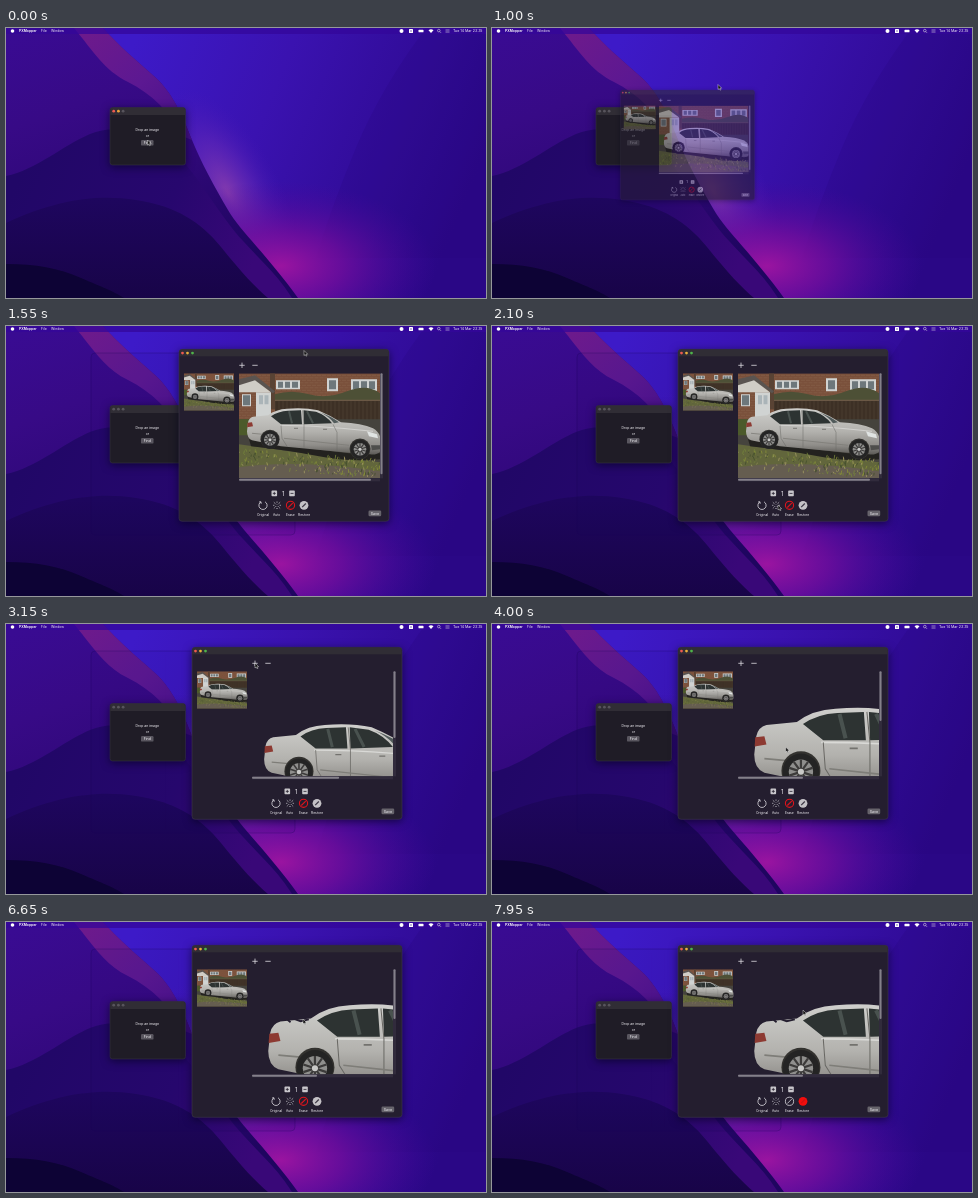
An HTML page that plays this animation: 480 by 270 pixels, repeating every 8000 ms.

```html
<!DOCTYPE html>
<html lang="en">
<head>
<meta charset="utf-8">
<title>Background eraser demo</title>
<style>
html, body { margin: 0; width: 100%; height: 100%; overflow: hidden; background: #1d0758; }
svg { display: block; width: 100vw; height: 100vh; }
text { font-family: Inter, "Open Sans", sans-serif; font-size: 3.6px; fill: #f2f0f5; }
.mid { text-anchor: middle; }
.line { fill: none; stroke: #dcdae0; stroke-width: .8; }
.shadow { filter: drop-shadow(0 2px 4px rgba(0, 0, 20, .6)); }
</style>
</head>
<body>
<svg viewBox="0 0 480 270">
<defs>
  <linearGradient id="sky" gradientUnits="userSpaceOnUse" x1="130" y1="10" x2="470" y2="150">
    <stop offset="0" stop-color="#3d1ac8"/><stop offset=".4" stop-color="#3a12b0"/><stop offset="1" stop-color="#2a0786"/>
  </linearGradient>
  <radialGradient id="mauve">
    <stop offset="0" stop-color="#8c3fae" stop-opacity=".9"/><stop offset=".5" stop-color="#6a2cb6" stop-opacity=".5"/><stop offset="1" stop-color="#4518b4" stop-opacity="0"/>
  </radialGradient>
  <radialGradient id="glow">
    <stop offset="0" stop-color="#9a14a0"/><stop offset=".4" stop-color="#720d9c" stop-opacity=".8"/><stop offset="1" stop-color="#48089a" stop-opacity="0"/>
  </radialGradient>
  <linearGradient id="ridge" gradientUnits="userSpaceOnUse" x1="30" y1="0" x2="130" y2="270">
    <stop offset="0" stop-color="#390b92"/><stop offset=".3" stop-color="#370a86"/><stop offset=".6" stop-color="#2f0878"/><stop offset="1" stop-color="#1f0560"/>
  </linearGradient>
  <linearGradient id="crest" gradientUnits="userSpaceOnUse" x1="85" y1="5" x2="180" y2="110">
    <stop offset="0" stop-color="#6c1a8c"/><stop offset=".5" stop-color="#5c1892"/><stop offset="1" stop-color="#450f8a"/>
  </linearGradient>
  <linearGradient id="slope" gradientUnits="userSpaceOnUse" x1="20" y1="130" x2="250" y2="230">
    <stop offset="0" stop-color="#210767"/><stop offset=".6" stop-color="#27076e"/><stop offset="1" stop-color="#390878"/>
  </linearGradient>
  <linearGradient id="deep" x2="0" y2="1">
    <stop offset="0" stop-color="#1e065e"/><stop offset="1" stop-color="#180448"/>
  </linearGradient>
  <linearGradient id="silver" x2="0" y2="1">
    <stop offset="0" stop-color="#cfcfcc"/><stop offset=".5" stop-color="#b3b2ae"/><stop offset=".8" stop-color="#8f8d89"/><stop offset="1" stop-color="#5c5a57"/>
  </linearGradient>
  <clipPath id="view"><rect x="60" y="24" width="141" height="105"/></clipPath>
  <clipPath id="frame"><rect width="141" height="105"/></clipPath>

  <g id="wheel">
    <circle r="9" fill="#242424"/><circle r="6" fill="#8f8f8d"/>
    <path d="M0-6V6M-5.7-1.9 5.7 1.9M-3.5 4.9 3.5-4.9M3.5 4.9-3.5-4.9M-5.7 1.9 5.7-1.9" stroke="#3c3b3a" stroke-width="1.100"/>
    <circle r="1.500" fill="#c9c9c7"/>
  </g>

  <g id="scene" clip-path="url(#frame)">
    <rect width="141" height="105" fill="#7a503b"/>
    <g id="bricks" stroke="#8f6b51" stroke-width=".4"></g>
    <path d="M31 0h5v36h-5z" fill="#594334"/>
    <g fill="#d0d3d2">
      <path d="M37 7h24v9H37zM88 5h11v13H88zM112 6h26v12h-26z"/>
      <path d="M17 19h15v30H17zM3 21h9v12H3z"/>
    </g>
    <path d="M39 8.500h5v6h-5zM46 8.500h5v6h-5zM53 8.500h6v6h-6zM90 7h7v9h-7zM114 8h6v8h-6zM122 8h6v8h-6zM130 8h6v8h-6zM4 22h7v10H4z" fill="#6d777b"/>
    <path d="M20 22h4v9h-4zM25.500 22h4v9h-4z" fill="#aab4b8"/>
    <path d="M0 6 16 2 36 18 34 20 16 8 0 14z" fill="#5a5450"/>
    <path d="M0 12 16 7 32 19H0z" fill="#d0cdc6"/>
    <path d="M36 21q16-5 34 0t38-3 33 2v14H36z" fill="#4d5036"/>
    <path d="M36 27H141V58H36z" fill="#43362a"/>
    <path id="fence" stroke="#30251d" stroke-width=".6"/>
    <path d="M36 27H141" stroke="#75604b"/>
    <path d="M0 46H141V105H0z" fill="#45433d"/>
    <path d="M0 46h40v16H0z" fill="#4c5a2b"/>
    <path d="M0 71Q50 78 80 82T141 89V105H0z" fill="#62663c"/>
    <path d="M0 94Q60 86 141 98V105H0z" fill="#655d50"/>
    <path d="M10 66 42 72 110 80 141 80V86Q110 89 80 83T12 73z" fill="#23221f"/>
    <g id="grass" stroke-width=".8" fill="none"></g>
  </g>

  <g id="car">
    <path d="M9 49Q10 44.500 14 43.500L29 42Q37 36 48 35.500 65 34 79 37 91 42 102 49 123 50 134 55 141 59 142 67V77Q139 82 131 81L110 79.500 42 73 13 67Q8 65 8 58z" fill="url(#silver)"/>
    <path d="M32 43Q39 38 49 37.500L62 37 63 51 42 51zM64.500 37 77 38.500Q87 42 93 50L65 51z" fill="#2d3332"/>
    <path d="M50 38 53 50M68 38 74 50" stroke="#66716c" stroke-width="2" opacity=".5"/>
    <path d="M81 39Q92 43 100 49L95 50Q90 43 81 39z" fill="#515b5b"/>
    <path d="M41 52Q70 52 103 55L134 58" fill="none" stroke="#d9d9d6" stroke-width=".8"/>
    <path d="M63.500 37 65 52 65 74M42 52 43 65 48 73M94 51 98 59 98 78" fill="none" stroke="#696864" stroke-width=".5"/>
    <path d="M13 60 24 61M45 65 110 72" stroke="#7e7d78" stroke-width=".8"/>
    <path d="M55 55h4M84 56h4" stroke="#73726e" stroke-width=".9"/>
    <path d="M8.500 49.500 13 49 14 53 8.200 54z" fill="#8d3a32"/>
    <path d="M128 58 138 61 139 65 130 63z" fill="#e0e4e3"/>
    <path d="M132 72 141 72V76L133 77z" fill="#4e4e4c"/>
    <circle cx="31" cy="66" r="9.600" fill="#33322f"/>
    <circle cx="121" cy="75.500" r="10.400" fill="#33322f"/>
    <use href="#wheel" x="31" y="66.500"/>
    <use href="#wheel" transform="translate(121 76) scale(1.050)"/>
  </g>
</defs>

<rect width="480" height="270" fill="url(#sky)"/>
<path d="M420 0Q375 60 350 120T310 230H480V0z" fill="#26067c" opacity=".22"/>
<ellipse rx="115" ry="52" fill="url(#mauve)" transform="translate(222 165) rotate(62)"/>
<ellipse cx="275" cy="238" rx="155" ry="85" fill="url(#glow)"/>
<path d="M97 0C113 18 130 32 149 49S178 92 186 112 209 160 222 182 262 228 292 270H0V0z" fill="url(#ridge)"/>
<path d="M68 0H97C113 18 130 32 149 49S178 92 186 112L176 108C164 84 146 66 122 54S88 24 68 0z" fill="url(#crest)"/>
<path d="M0 148C30 142 56 118 84 106S150 106 172 128 212 186 238 214 272 248 286 270H0z" fill="url(#slope)"/>
<path d="M0 195C50 172 90 166 130 172S195 194 215 219 250 260 262 270H0z" fill="url(#deep)"/>
<path d="M0 236C30 236 52 240 75 250S105 262 118 270H0z" fill="#0d0335"/>
<rect id="ghost" x="85" y="27" width="204" height="182" rx="4" fill="#180450" fill-opacity=".06" stroke="#1c0758" stroke-opacity=".45" stroke-width=".6"/>

<g id="menu">
  <rect width="480" height="6" fill="#34069a" opacity=".72"/>
  <circle cx="6.500" cy="3" r="1.800" fill="#fff"/>
  <text x="13" y="4.300" font-weight="700" style="font-size:3.400px">PXMopper</text>
  <text x="35" y="4.300" style="font-size:3.400px">File</text>
  <text x="45" y="4.300" style="font-size:3.400px">Window</text>
  <g fill="#fff">
    <circle cx="395.500" cy="3" r="2"/><rect x="403" y="1" width="4" height="4" rx=".6"/>
    <rect x="412.500" y="1.800" width="5" height="2.500" rx=".6"/>
    <path d="M422.500 2.200Q425 .2 427.500 2.200L425 5z"/>
  </g>
  <path d="M404 3h2" stroke="#32088a" stroke-width=".6"/>
  <g class="line" style="stroke-width:.6">
    <circle cx="432.800" cy="2.600" r="1.300"/><path d="M433.800 3.600 435 4.800M439.500 2h4M439.500 4h4"/>
  </g>
  <text x="447" y="4.300">Tue 14 Mar 23:35</text>
</g>

<g class="shadow">
  <rect x="104" y="79.500" width="75.500" height="57.500" rx="2.500" fill="#1f1c26" stroke="#3b3646" stroke-width=".5"/>
  <path d="M104.300 87V82Q104.300 79.800 106.500 79.800H177Q179.200 79.800 179.200 82V87z" fill="#302d35"/>
  <g id="dropLights"></g>
  <text class="mid" x="141.300" y="103" style="font-size:3.450px">Drop an image</text>
  <text class="mid" x="141.300" y="109.300" style="font-size:3.300px">or</text>
  <rect x="135" y="112" width="12.500" height="5.600" rx="1.200" fill="#59565f"/>
  <text class="mid" x="141.300" y="116.100">Find</text>
</g>

<g id="win" class="shadow">
  <rect width="210" height="172" rx="3" fill="#241e2f" stroke="#443d50" stroke-width=".5"/>
  <path d="M.3 7V3Q.3.3 3 .3H207Q209.700.3 209.700 3V7z" fill="#302d35"/>
  <g id="winLights"></g>
  <path class="line" d="M60.300 16h5.400M63 13.300v5.400M73.300 16h5.400"/>
  <g transform="translate(5 24) scale(.355)"><use href="#scene"/><use href="#car"/></g>
  <g clip-path="url(#view)"><g id="zoom">
    <use id="backdrop" href="#scene"/><use href="#car"/>
    <path id="rubbed" d="M17.500 42.600 19 43.800M21 42.300l3 1 4-.9" fill="none" stroke="#241e2f" stroke-width=".9"/>
  </g></g>
  <rect x="60" y="129" width="141" height="3" fill="#312b3c"/>
  <rect x="201" y="24" width="3" height="105" fill="#312b3c"/>
  <rect id="barX" x="60" y="129.500" height="2" rx="1" fill="#84808a"/>
  <rect id="barY" x="201.500" y="24" width="2" rx="1" fill="#84808a"/>
  <g fill="#c9c7cc"><rect x="92.500" y="141.300" width="5.600" height="5.600" rx=".8"/><rect x="110.200" y="141.300" width="5.600" height="5.600" rx=".8"/></g>
  <path d="M93.800 144.100h3M95.300 142.600v3M111.500 144.100h3" stroke="#26212f" stroke-width=".8"/>
  <text class="mid" x="104.300" y="146.300" style="font-size:5.800px">1</text>
  <g class="line">
    <path d="M82 152.500A4.100 4.100 0 1 0 86 152.500M82 152.500l.2 2M82 152.500l-2 .2"/>
    <path id="sparks" stroke-width=".9"/>
  </g>
  <g id="erase" fill="none"><circle cx="111.500" cy="156" r="4.100"/><path d="M109.300 158.200 113.700 153.800"/></g>
  <circle id="restore" cx="125" cy="156" r="4.400"/>
  <path id="brush" d="M123.200 157.800 126.800 154.200" stroke-width="1.200"/>
  <g id="labels"></g>
  <rect x="189.500" y="161.300" width="12.700" height="5.700" rx="1.200" fill="#66636b"/>
  <text class="mid" x="195.900" y="165.500">Save</text>
</g>

<path id="cursor" d="M0 0V5L1.200 4 2 5.700 2.900 5.300 2.100 3.700H3.700z" fill="#111" stroke="#fff" stroke-width=".4"/>
</svg>
<script>
const LOOP = 8000;
const $ = id => document.getElementById(id);
const set = (el, attrs) => { for (const k in attrs) el.setAttribute(k, attrs[k]); };
const clamp = v => Math.max(0, Math.min(1, v));
const ease = p => p * p * (3 - 2 * p);

function add(parent, tag, attrs, text = "") {
  const el = document.createElementNS("http://www.w3.org/2000/svg", tag);
  set(el, attrs);
  el.textContent = text;
  parent.appendChild(el);
  return el;
}

// Keys are [time, x, y]; holds before the first and after the last.
function follow(keys, t) {
  let a = keys[0];
  for (const b of keys) {
    if (t < b[0]) {
      const p = ease(clamp((t - a[0]) / (b[0] - a[0])));
      return [a[1] + (b[1] - a[1]) * p, a[2] + (b[2] - a[2]) * p];
    }
    a = b;
  }
  return [a[1], a[2]];
}

let seed = 7;
const rand = () => (seed = (seed * 16807) % 2147483647) / 2147483647;

function lights(parent, x, y, gap) {
  return ["#ee5a50", "#e9b13c", "#4fb44a"].map((fill, i) =>
    add(parent, "circle", { cx: x + gap * i, cy: y, r: 1.4, fill }));
}
const dropDots = lights($("dropLights"), 107.7, 83.2, 4.7);
lights($("winLights"), 3.5, 3.8, 5);

["Original", "Auto", "Erase", "Restore"].forEach((name, i) =>
  add($("labels"), "text", { x: 84 + 13.7 * i, y: 166.5, class: "mid", style: "font-size:3.35px" }, name));

let rays = "";
for (let i = 0; i < 8; i++) {
  const c = Math.cos(i * Math.PI / 4), s = Math.sin(i * Math.PI / 4);
  const from = i % 2 ? 1.4 : 2.7;
  rays += `M${98 + from * c} ${156 + from * s}l${c} ${s}`;
  if (i % 2) rays += `M${98 + 3.4 * c} ${156 + 3.4 * s}l${c} ${s}`;
}
set($("sparks"), { d: rays });

let planks = "";
for (let x = 38; x < 141; x += 4) planks += `M${x} 28V52`;
set($("fence"), { d: planks });

for (let y = 2; y < 46; y += 2.5) {
  add($("bricks"), "path", { d: `M0 ${y}H141`, "stroke-dasharray": "4 1", "stroke-dashoffset": y });
}
for (let i = 0; i < 190; i++) {
  const x = rand() * 141, y = 77 + x * .08 + rand() * 18;
  add($("grass"), "path", {
    d: `M${x} ${y}l${rand() * 3 - 1.5} ${-1 - rand() * 3}`,
    stroke: ["#8a9138", "#434f2c", "#75863a", "#a29b63"][i % 4]
  });
}

const drag = [[1250, 90.5, 31], [1550, 173, 23.3], [1750, 186, 23.3]];
const pointer = [
  [300, 141.5, 112], [950, 226, 56.5], [1020, 226, 56.5], [1200, 215.5, 32.5], [1250, 215.5, 32.5],
  [1550, 298, 24.5], [1750, 311, 24.5], [2060, 286, 179], [2450, 286, 179], [2850, 249, 39],
  [3650, 249, 39], [4100, 300, 135], [4350, 298, 178], [4550, 298, 178], [4950, 270, 113],
  [5300, 279, 102], [5850, 282, 99], [6250, 288, 110], [6650, 297, 97], [7000, 311, 178],
  [7200, 311, 178], [7550, 311, 102], [7950, 311, 88]
];
const zoomTimes = [2950, 3100, 3350, 3500];

function draw(t) {
  const open = clamp((t - 880) / 240);
  const [wx, wy] = follow(drag, t);
  const size = .27 + .73 * open;
  set($("win"), {
    transform: `translate(${wx + 105 * (1 - size)} ${wy + 86 * (1 - size)}) scale(${size})`,
    opacity: clamp(open * 1.2), display: open ? "inline" : "none"
  });
  set($("ghost"), { display: t >= 1250 ? "inline" : "none" });

  const active = t < 850;
  dropDots.forEach((dot, i) => set(dot, { fill: active ? ["#ee5a50", "#e9a13c", "#57545c"][i] : "#57545c" }));

  const scale = 1 + .2575 * zoomTimes.filter(z => t >= z).length;
  const scroll = 36 * ease(clamp((t - 3650) / 400));
  set($("zoom"), { transform: `translate(60 ${24 - scroll}) scale(${scale})` });
  set($("backdrop"), { display: t < 2450 ? "inline" : "none" });
  set($("rubbed"), { "stroke-dasharray": "14 14", "stroke-dashoffset": 14 * (1 - clamp((t - 4950) / 1600)) });
  set($("barX"), { width: 132 / scale });
  set($("barY"), { height: 101 / scale });

  const restoring = t >= 7050;
  set($("erase"), { stroke: restoring ? "#dcdae0" : "#e0141c", "stroke-width": restoring ? .8 : 1.1 });
  set($("restore"), { fill: restoring ? "#f20d0d" : "#c4c2c6" });
  set($("brush"), { stroke: restoring ? "#d01010" : "#3a3542" });

  set($("cursor"), { transform: `translate(${follow(pointer, t).join(" ")})` });
}

const start = performance.now();
function tick() {
  draw((performance.now() - start) % LOOP);
  requestAnimationFrame(tick);
}
draw(0);
requestAnimationFrame(tick);
</script>
</body>
</html>
```
